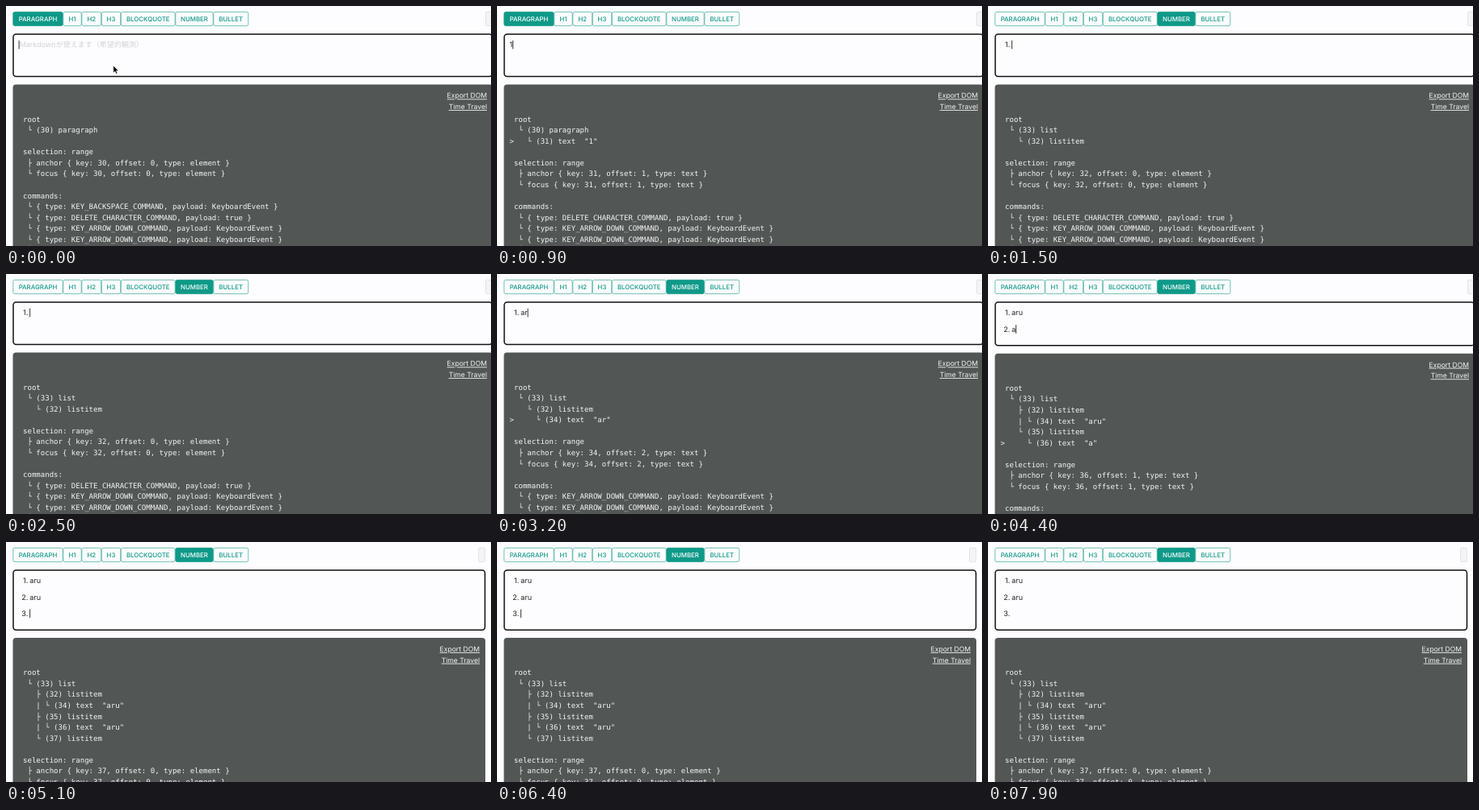
These frames come from a looping animation (600 px wide and 298 px high, 8000 ms). An HTML page:

```html
<!DOCTYPE html>
<html lang="ja">
<head>
<meta charset="utf-8">
<style>
  html, body { margin: 0; width: 100%; height: 100%; overflow: hidden; background: #fdfcfe; }
  svg { display: block; width: 600px; height: 298px; }
  text { font: 9.04px Inter, "Noto Sans CJK JP", sans-serif; fill: #222; white-space: pre; text-rendering: geometricPrecision; }
  .button { font-size: 7.85px; font-weight: 500; text-anchor: middle; }
  .link { font-size: 8.6px; fill: #f2f3f3; text-anchor: end; text-decoration: underline; }
  .tree { font-family: "DejaVu Sans Mono", monospace; fill: #f4f5f5; }
  .hint { fill: #d2d2d4; }
  .num { text-anchor: end; }
</style>
</head>
<body>
<svg id="stage" viewBox="0 0 600 298"></svg>
<script>
const LOOP = 8000, BLINK = 500, TEAL = '#0f9988';
const stage = document.getElementById('stage');
const labels = ['PARAGRAPH', 'H1', 'H2', 'H3', 'BLOCKQUOTE', 'NUMBER', 'BULLET'];
const edges = [8.5, 70.5, 93.5, 118, 142, 209.5, 256.5, 300];
const itemKeys = [32, 35, 37], textKeys = [34, 36];
const keyCommand = (name, payload = 'KeyboardEvent') => `  └ { type: ${name}_COMMAND, payload: ${payload} }`;
const commands = [
  keyCommand('KEY_BACKSPACE'), keyCommand('DELETE_CHARACTER', 'true'),
  ...Array(3).fill(keyCommand('KEY_ARROW_DOWN'))
];

// Each key press: time, paragraph text or list items, commands dropped from the log
const steps = [
  { t: 0, para: '', drop: 0 },
  { t: 800, para: '1', drop: 1 },
  { t: 1200, para: '1.', drop: 1 },
  { t: 1500, items: [''], drop: 1 },
  { t: 2900, items: ['a'], drop: 2 },
  { t: 3100, items: ['ar'], drop: 2 },
  { t: 3300, items: ['aru'], drop: 2 },
  { t: 3600, items: ['aru', ''], drop: 2 },
  { t: 4400, items: ['aru', 'a'], drop: 2 },
  { t: 4600, items: ['aru', 'ar'], drop: 2 },
  { t: 4700, items: ['aru', 'aru'], drop: 2 },
  { t: 5000, items: ['aru', 'aru', ''], drop: 2 }
];

const text = (x, y, s, cls = '') => `<text x="${x}" y="${y}" class="${cls}">${s}</text>`;
const rect = (x, y, w, h, r, fill, stroke = 'none', sw = 1) =>
  `<rect x="${x}" y="${y}" width="${w}" height="${h}" rx="${r}" fill="${fill}" stroke="${stroke}" stroke-width="${sw}"/>`;

function treeLines({ para, items, drop }) {
  const lines = [' root'];
  let value, key, textKey;
  if (items) {
    const last = items.length - 1;
    lines.push('  └ (33) list');
    items.forEach((s, i) => {
      const end = i === last;
      lines.push(`    ${end ? '└' : '├'} (${itemKeys[i]}) listitem`);
      if (s) lines.push(`${end ? '&gt;' : ' '}   ${end ? ' ' : '|'} └ (${textKeys[i]}) text  "${s}"`);
    });
    value = items[last];
    key = itemKeys[last];
    textKey = textKeys[last];
  } else {
    lines.push('  └ (30) paragraph');
    if (para) lines.push(`&gt;   └ (31) text  "${para}"`);
    value = para;
    key = 30;
    textKey = 31;
  }
  const point = `{ key: ${value ? textKey : key}, offset: ${value.length}, type: ${value ? 'text' : 'element'} }`;
  return [...lines, '', ' selection: range', `  ├ anchor ${point}`, `  └ focus ${point}`,
    '', ' commands:', ...commands.slice(drop)];
}

function toolbar(active) {
  return labels.map((label, i) => {
    const x = edges[i], w = edges[i + 1] - x, on = i === active;
    return rect(x + .3, 7.4, w - .6, 17.2, 2, on ? TEAL : 'none', on ? TEAL : '#4fb3a6', .8) +
      `<text class="button" x="${x + w / 2}" y="18.9" style="fill:${on ? '#fff' : TEAL}">${label}</text>`;
  }).join('');
}

function draw(step) {
  const { para, items } = step;
  const count = items ? items.length : 1;
  const bottom = [88, 89.3, 109.7][count - 1];
  const top = bottom + 9.4;
  const right = count > 2 ? 593 : 602;

  let body;
  if (items) {
    body = items.map((s, i) => {
      const y = 51.4 + i * 20.4;
      return text(27.3, y, `${i + 1}.`, 'num') + text(29.3, y, s, 'value');
    }).join('');
  } else {
    body = para ? text(15.6, 51.4, para, 'value')
      : text(16.6, 51.4, 'Markdownが使えます（希望的観測）', 'hint');
  }

  stage.innerHTML = toolbar(items ? 5 : 0) +
    rect(right - 8.5, 7.4, 8, 17.2, 1.5, '#f4f3f5', '#dddce0', .8) +
    rect(9, 35, right - 9.5, bottom - 35.5, 3.5, 'none', '#111', 1.5) + body +
    rect(8.5, top, right - 8.5, 320, 4, '#525756') +
    text(right - 7, top + 17, 'Export DOM', 'link') +
    text(right - 7, top + 30.6, 'Time Travel', 'link') +
    treeLines(step).map((s, i) => text(15.6, top + 46.2 + i * 13.56, s, 'tree')).join('') +
    (para === '' ? '<path d="M132.8 74v9l2-1.8 1.5 3.1 1.5-.7-1.4-3h2.8z" fill="#000" stroke="#fff" stroke-width=".6"/>' : '') +
    '<rect id="caret" width=".9" height="10.6" fill="#222"/>';

  const value = [...stage.querySelectorAll('.value')].pop();
  const width = value && value.textContent ? value.getComputedTextLength() : 0;
  const caret = document.getElementById('caret');
  caret.setAttribute('x', (items ? 29.2 : 15.6) + width);
  caret.setAttribute('y', 42.8 + (count - 1) * 20.4);
}

let shown;
function frame(now) {
  const t = now % LOOP;
  const step = steps.filter(s => s.t <= t).pop();
  if (step !== shown) draw(shown = step);
  const on = Math.floor((t - step.t) / BLINK) % 2 === 0;
  document.getElementById('caret').setAttribute('opacity', on ? 1 : 0);
  requestAnimationFrame(() => frame(performance.now() - start));
}
const start = performance.now();
frame(0);
</script>
</body>
</html>
```
